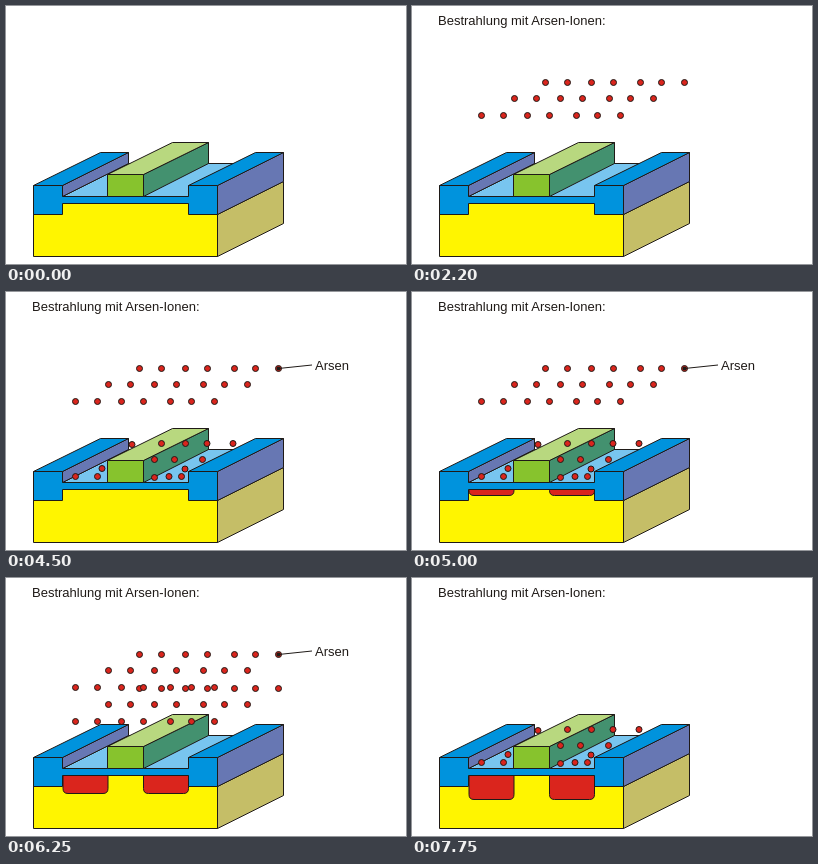
Animation, 400 px wide and 258 px high, one loop 8 s. Source, as an HTML page:

```html
<!DOCTYPE html>
<html lang="de">
<head>
<meta charset="utf-8">
<title>Bestrahlung mit Arsen-Ionen</title>
<style>
html, body { margin: 0; width: 100%; height: 100%; overflow: hidden; background: #fff; }
svg { display: block; width: 400px; height: 258px; }
text { font: 13px "Liberation Sans", Arial, sans-serif; fill: #1f1a17; }
.solid, .ion { stroke: #1f1a17; stroke-width: 1; stroke-linejoin: round; }
.ion { fill: #da251d; }
.anim { animation: 8s step-end infinite; }

#title { animation-name: title; }
#label { animation-name: label; }
#high { animation-name: high; }
#mid { animation-name: mid; }
#low { animation-name: low; }
#wells { animation-name: sink; }

@keyframes title {
  0% { opacity: 0; }
  12.5% { opacity: .33; }
  13.75% { opacity: .67; }
  15%, 100% { opacity: 1; }
}
@keyframes label {
  0%, 93.75%, 100% { opacity: 0; }
  28.75% { opacity: .33; }
  30% { opacity: .67; }
  31.25% { opacity: 1; }
}
@keyframes high {
  0%, 93.75%, 100% { opacity: 0; }
  27.5% { opacity: 1; }
}
@keyframes mid {
  0%, 50%, 56.25%, 62.5%, 68.75%, 75%, 81.25%, 87.5%, 96.875%, 100% { opacity: 0; }
  43.75%, 53.125%, 59.375%, 65.625%, 71.875%, 78.125%, 84.375%, 90.625% { opacity: 1; }
}
@keyframes low {
  0%, 53.125%, 59.375%, 65.625%, 71.875%, 78.125%, 84.375%, 90.625% { opacity: 0; }
  46.875%, 56.25%, 62.5%, 68.75%, 75%, 81.25%, 87.5%, 93.75%, 100% { opacity: 1; }
}
/* the doped wells slide down from behind the oxide */
@keyframes sink {
  0% { transform: translateY(-26px); }
  59.375% { transform: translateY(-18px); }
  65.625% { transform: translateY(-12px); }
  78.125% { transform: translateY(-6px); }
  90.625%, 100% { transform: none; }
}
</style>
</head>
<body>
<svg viewBox="0 0 400 258">
  <defs>
    <circle id="ion" class="ion" r="3"/>
    <g id="row">
      <use href="#ion" x="133.5"/>
      <use href="#ion" x="155.5"/>
      <use href="#ion" x="179.5"/>
      <use href="#ion" x="201.5"/>
      <use href="#ion" x="228.5"/>
      <use href="#ion" x="249.5"/>
      <use href="#ion" x="272.5"/>
    </g>
    <g id="sheet">
      <use href="#row" y="76.5"/>
      <use href="#row" x="-31" y="92.5"/>
      <use href="#row" x="-64" y="109.5"/>
    </g>
    <path id="well" d="M57 197V216.500Q57 221.500 62 221.500H97Q102 221.500 102 216.500V197Z"/>
  </defs>

  <g class="solid">
    <!-- substrate -->
    <path fill="#fff500" d="M27.500 250.500V190.500H211.500V250.500Z"/>
    <path fill="#c5be67" d="M211.500 208.500L277.500 175.500V217.500L211.500 250.500Z"/>
    <g id="wells" class="anim" fill="#da251d">
      <use href="#well"/>
      <use href="#well" x="80.500"/>
    </g>
    <!-- oxide -->
    <path fill="#78c5ef" d="M56.500 190.500L122.500 157.500H228.500L182.500 180V190.500Z"/>
    <path fill="#6777b3" d="M56.500 179.500L122.500 146.500V157.500L56.500 190.500Z"/>
    <path fill="#0093dd" d="M27.500 179.500L94.500 146.500H122.500L56.500 179.500Z"/>
    <path fill="#6777b3" d="M211.500 179.500L277.500 146.500V175.500L211.500 208.500Z"/>
    <path fill="#0093dd" d="M182.500 179.500L249.500 146.500H277.500L211.500 179.500Z"/>
    <path fill="#0093dd" d="M27.500 179.500H56.500V190.500H182.500V179.500H211.500V208.500H182.500V197.500H56.500V208.500H27.500Z"/>
    <!-- gate -->
    <path fill="#43916f" d="M137.500 168.500L202.500 136.500V157.500L137.500 190.500Z"/>
    <path fill="#b8d87f" d="M101.500 168.500L166.500 136.500H202.500L137.500 168.500Z"/>
    <path fill="#87c32d" d="M101.500 168.500H137.500V190.500H101.500Z"/>
  </g>

  <g id="low" class="anim">
    <use href="#ion" x="126" y="152.500"/>
    <use href="#ion" x="155.500" y="151.500"/>
    <use href="#ion" x="179.500" y="151.500"/>
    <use href="#ion" x="201" y="151.500"/>
    <use href="#ion" x="227" y="151.500"/>
    <use href="#ion" x="148.500" y="167.500"/>
    <use href="#ion" x="168.500" y="167.500"/>
    <use href="#ion" x="196.500" y="167.500"/>
    <use href="#ion" x="96" y="176.500"/>
    <use href="#ion" x="179" y="177"/>
    <use href="#ion" x="69.500" y="184.500"/>
    <use href="#ion" x="91.500" y="184.500"/>
    <use href="#ion" x="148.500" y="185.500"/>
    <use href="#ion" x="163" y="184.500"/>
    <use href="#ion" x="175.500" y="184.500"/>
  </g>
  <g id="mid" class="anim"><use href="#sheet" y="34"/></g>
  <g id="high" class="anim"><use href="#sheet"/></g>

  <g id="label" class="anim">
    <path d="M272.500 76.500L306 73" stroke="#1f1a17"/>
    <circle cx="272.500" cy="76.500" r="2" fill="#1f1a17"/>
    <text x="309" y="78">Arsen</text>
  </g>
  <text id="title" class="anim" x="26" y="19">Bestrahlung mit Arsen-Ionen:</text>
</svg>
</body>
</html>
```
